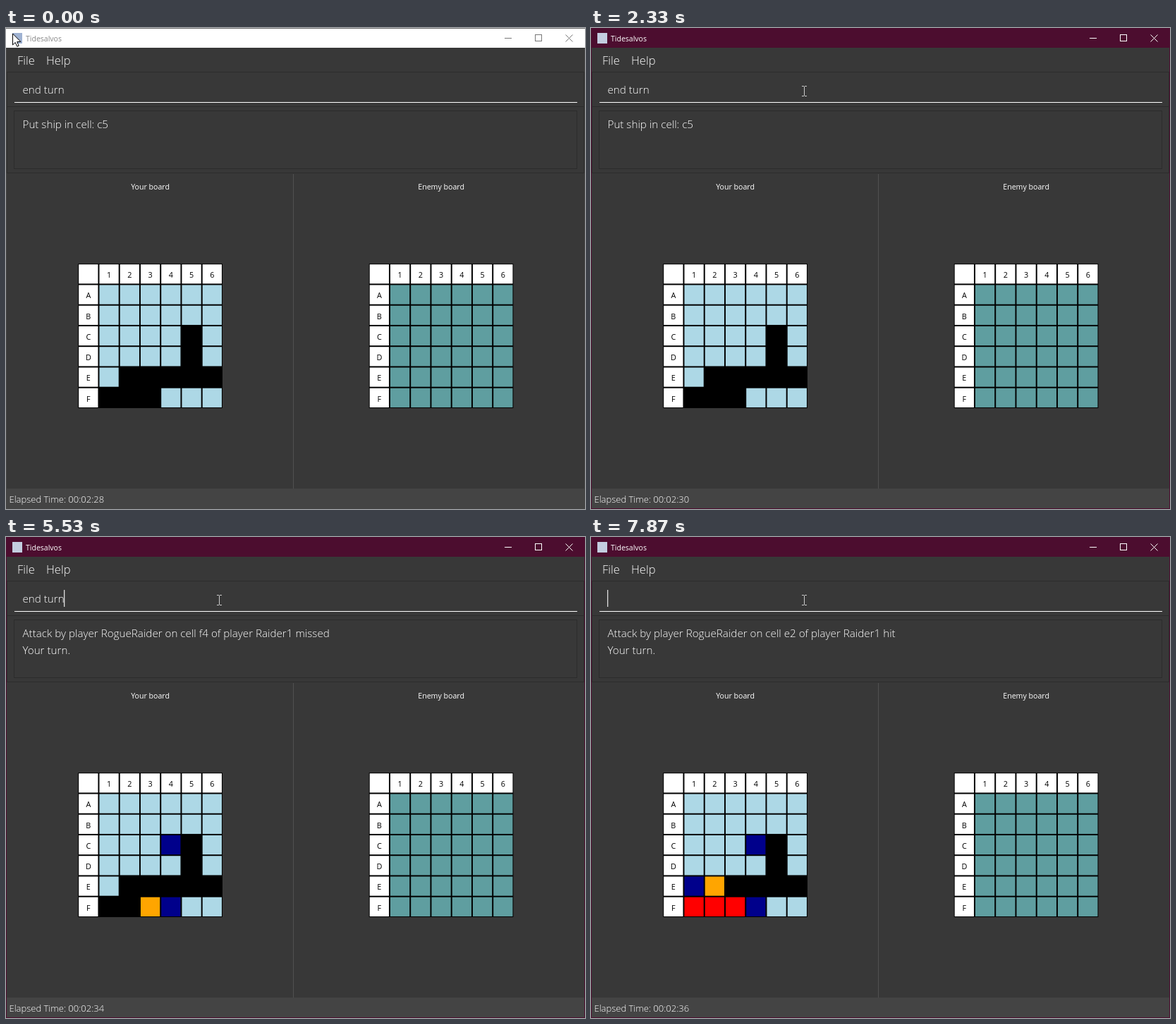
These frames come from a looping animation (821 px wide and 682 px high, 8 s). An HTML page with a canvas:

```html
<!DOCTYPE html>
<html lang="en">
<head>
<meta charset="utf-8">
<title>Tidesalvos</title>
<style>
html, body { margin: 0; width: 100%; height: 100%; overflow: hidden; background: #383838; }
canvas { display: block; }
</style>
</head>
<body>
<canvas id="stage" width="821" height="682"></canvas>
<script>
const ctx = document.getElementById('stage').getContext('2d');
const LOOP = 8000, FPS = 15;
const FAMILY = '"Open Sans", "Noto Sans", sans-serif';
const LIGHT = '#add8e6', TEAL = '#5f9ea0', NAVY = '#00008b', ORANGE = '#ffa500', RED = '#ff0000';
const COMMAND = 'end turn';
const ACTIVATE = 2330;
const BAR = 28, BODY_SIZE = 15.2;

// Enemy attacks: time, cell, outcome and the cells it paints
const attacks = [
  [3000, 'c4', 'missed', { C4: NAVY }],
  [4270, 'f3', 'hit', { F3: ORANGE }],
  [5130, 'f4', 'missed', { F4: NAVY }],
  [5800, 'f2', 'hit', { F2: ORANGE }],
  [6400, 'f1', 'destroyed destroyer', { F1: RED, F2: RED, F3: RED }],
  [7130, 'e1', 'missed', { E1: NAVY }],
  [7870, 'e2', 'hit', { E2: ORANGE }]
];
const ships = ['C5', 'D5', 'E2', 'E3', 'E4', 'E5', 'E6', 'F1', 'F2', 'F3'];

// Command field: time, text, caret shown
const field = [
  [0, COMMAND, false], [2400, COMMAND, true], [2930, COMMAND, false],
  [3000, '', true], [3470, '', false], [3930, COMMAND, true],
  [4270, '', true], [4730, '', false], [4930, COMMAND, true],
  [5130, '', true], [5530, COMMAND, true],
  [5800, '', true], [6130, COMMAND, true],
  [6400, '', true], [6870, COMMAND, true],
  [7130, '', true], [7600, COMMAND, true], [7870, '', true]
];
const clock = [[0, 28], [330, 29], [1330, 30], [2400, 31], [3470, 32], [5330, 34], [6400, 35], [7330, 36]];

const latest = (list, t) => list.filter(e => e[0] <= t).pop();

function rect(x, y, w, h, color) {
  ctx.fillStyle = color;
  ctx.fillRect(x, y, w, h);
}

function frame(x, y, w, h, color) {
  ctx.strokeStyle = color;
  ctx.lineWidth = 1;
  ctx.strokeRect(x + 0.5, y + 0.5, w - 1, h - 1);
}

function text(str, x, y, size, color = '#fff', weight = 300, align = 'left') {
  ctx.font = `${weight} ${size}px ${FAMILY}`;
  ctx.textAlign = align;
  ctx.fillStyle = color;
  ctx.fillText(str, x, y);
}

function lines(color, ...segments) {
  ctx.strokeStyle = color;
  ctx.lineWidth = 1;
  ctx.beginPath();
  for (const [x1, y1, x2, y2] of segments) {
    ctx.moveTo(x1, y1);
    ctx.lineTo(x2, y2);
  }
  ctx.stroke();
}

function drawTitleBar(active) {
  const ink = active ? '#fff' : '#777';
  rect(0, 0, 821, BAR, active ? '#4c0d2f' : '#fff');
  if (!active) rect(0, 0, 821, 1, '#6a6a6a');
  rect(9, 7, 14, 15, active ? '#c3cde0' : '#9fb2d2');
  text('Tidesalvos', 28, 19, 10.5, active ? '#fff' : '#888', 400);
  lines(ink, [707, 14.5, 717, 14.5], [793.5, 9.5, 803.5, 19.5], [803.5, 9.5, 793.5, 19.5]);
  frame(750, 9, 10, 10, ink);
}

function drawPanes(active) {
  rect(0, BAR, 821, 682 - BAR, '#383838');
  text('File', 16, 52, 16.5);
  text('Help', 57, 52, 16.5);
  frame(1, 62, 819, 50, '#2c2c2c');
  rect(12, 105, 798, 1, '#fff');
  frame(1, 111, 819, 95, '#2c2c2c');
  frame(11, 117, 799, 83, '#2c2c2c');
  rect(407, 207, 1, 446, '#505050');
  rect(0, 653, 821, 29, '#444');
  frame(0, BAR, 821, 682 - BAR, active ? '#4c0d2f' : '#434343');
  rect(1, BAR, 819, 1, '#383838');
}

function drawField(t) {
  const [, str, caret] = latest(field, t);
  text(str, 23.5, 93, BODY_SIZE);
  if (caret) rect(Math.round(23 + ctx.measureText(str).width), 75, 1.3, 24, '#ddd');
}

function drawMessage(t) {
  const attack = latest(attacks, t);
  if (!attack) return text('Put ship in cell: c5', 23.5, 142, BODY_SIZE);
  const [, cell, outcome] = attack;
  text(`Attack by player RogueRaider on cell ${cell} of player Raider1 ${outcome}`, 23.5, 142, BODY_SIZE);
  text('Your turn.', 23.5, 166, BODY_SIZE);
}

function drawBoard(left, title, colorOf) {
  const top = 334.2, pitch = 29.25, border = 1;
  const side = 7 * pitch, inner = pitch - 2 * border;
  text(title, left + side / 2, 229, 10.6, '#fff', 400, 'center');
  rect(left, top, side, side, '#000');
  for (let r = 0; r < 7; r++) {
    for (let c = 0; c < 7; c++) {
      const x = left + c * pitch, y = top + r * pitch;
      const row = ' ABCDEF'[r];
      const header = !r || !c;
      rect(x + border, y + border, inner, inner, header ? '#fff' : colorOf(row + c));
      if (header && r + c) {
        text(r ? row : c, x + pitch / 2, y + 20, 10.8, '#000', 400, 'center');
      }
    }
  }
}

function drawArrow(x, y) {
  ctx.save();
  ctx.translate(x + 0.5, y);
  ctx.beginPath();
  [[0, 0], [0, 16], [3.7, 12.5], [6.3, 18.3], [8.7, 17.2], [6.2, 11.6], [11.3, 11.4]]
    .forEach(p => ctx.lineTo(...p));
  ctx.closePath();
  ctx.fillStyle = '#fff';
  ctx.fill();
  ctx.strokeStyle = '#000';
  ctx.lineWidth = 1;
  ctx.stroke();
  ctx.restore();
}

function drawBeam(x, y) {
  lines('#ccc', [x + 0.5, y - 6, x + 0.5, y + 7],
    [x - 3, y - 6.5, x, y - 6.5], [x + 1, y - 6.5, x + 4, y - 6.5],
    [x - 3, y + 7.5, x, y + 7.5], [x + 1, y + 7.5, x + 4, y + 7.5]);
}

function drawCursor(t) {
  const step = Math.floor(t * FPS / 1000);
  const ease = (from, count) => {
    const p = Math.min(1, Math.max(0, (step - from) / count));
    return p * p * (3 - 2 * p);
  };
  const a = ease(4, 7), b = ease(29, 4);
  const x = Math.round(9 + 316 * a - 23 * b);
  const y = Math.round(8 + 232 * a - 151 * b);
  (y > 63 && y < 111 && b > 0 ? drawBeam : drawArrow)(x, y);
}

function draw(now) {
  const t = (now % LOOP) + 4;
  const active = t >= ACTIVATE;
  const cells = {};
  for (const s of ships) cells[s] = '#000';
  for (const [at, , , paint] of attacks) if (at <= t) Object.assign(cells, paint);

  drawPanes(active);
  drawTitleBar(active);
  drawField(t);
  drawMessage(t);
  drawBoard(102.2, 'Your board', id => cells[id] || LIGHT);
  drawBoard(514.7, 'Enemy board', () => TEAL);
  text('Elapsed Time: 00:02:' + latest(clock, t)[1], 4.5, 672.5, 13);
  drawCursor(t);
}

const start = performance.now();
function tick() {
  draw(performance.now() - start);
  requestAnimationFrame(tick);
}
tick();
</script>
</body>
</html>
```
